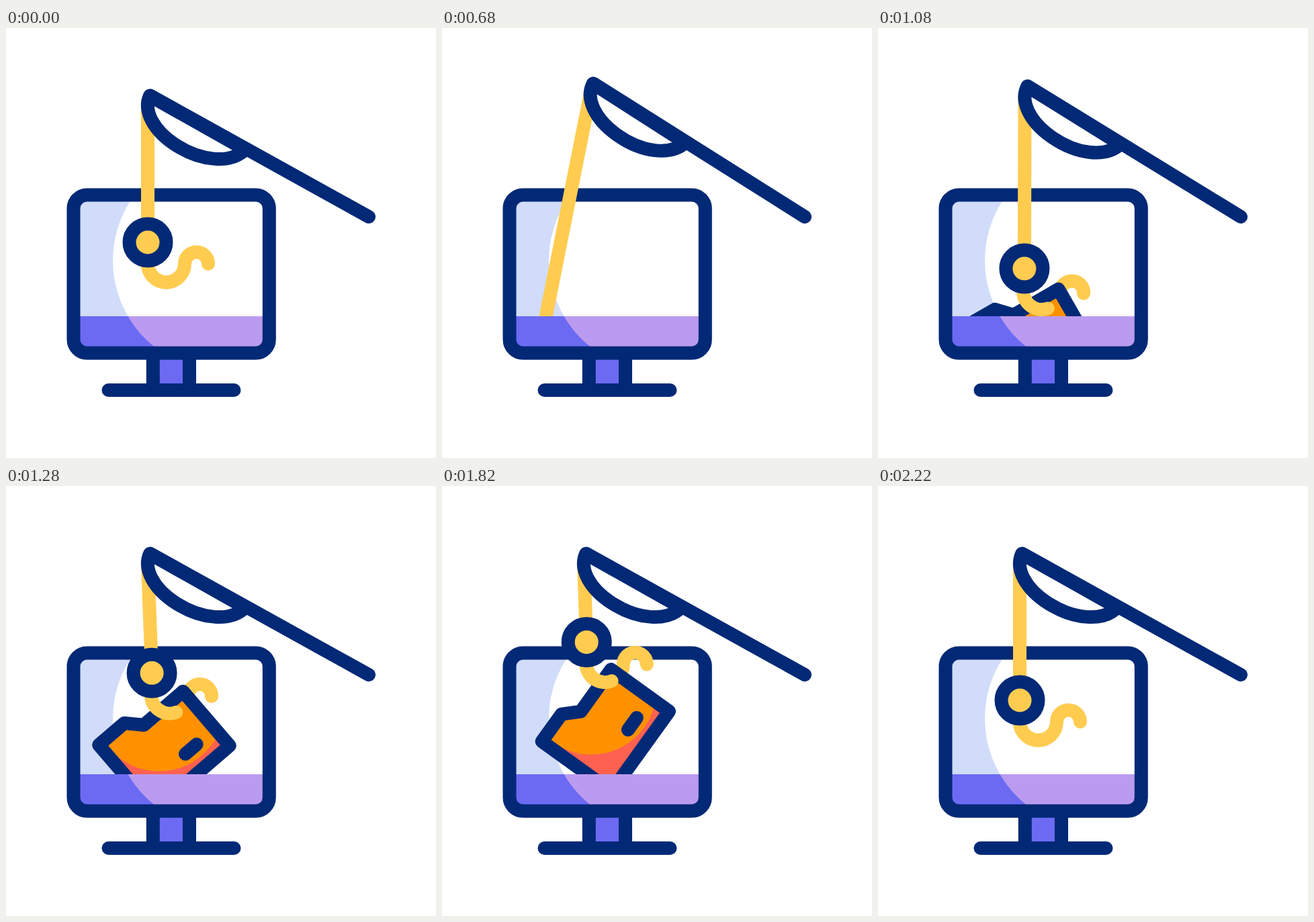
Recreate the animation shown at these times as an HTML page. Size 640 by 640 pixels, loop 2400 ms.

```html
<!DOCTYPE html>
<html lang="en">
<head>
<meta charset="utf-8">
<title>Phishing</title>
<style>
  html, body { margin: 0; width: 100%; height: 100%; overflow: hidden; background: #fff; }
  svg { display: block; width: 100vw; height: 100vh; }
  .ink { stroke: #022976; stroke-width: 20; stroke-linecap: round; stroke-linejoin: round; fill: none; }
  .gold { stroke: #ffcc50; stroke-width: 20; stroke-linecap: round; fill: none; }
</style>
</head>
<body>
<svg viewBox="0 0 640 640">
  <defs>
    <clipPath id="screen"><rect x="100.5" y="248.5" width="291" height="235.5" rx="20"/></clipPath>
    <clipPath id="air"><rect width="640" height="429"/></clipPath>
    <path id="body" d="M0 0H106.5V147H-21V97L0 77Z"/>
    <clipPath id="inside"><use href="#body"/></clipPath>
  </defs>

  <g id="monitor">
    <g clip-path="url(#screen)">
      <rect x="100" y="248" width="292" height="181" fill="#d1dcfa"/>
      <rect x="100" y="429" width="292" height="56" fill="#6c6af2"/>
      <g clip-path="url(#air)"><circle cx="323" cy="346" r="164" fill="#fff"/></g>
      <path d="M181.5 429A164 164 0 0 0 231 482V490H400V429Z" fill="#bb9bef"/>
    </g>
    <rect x="219" y="490" width="54" height="46" fill="#6c6af2"/>
    <path class="ink" d="M218.8 490V539M273 490V539M152.5 539H339.5"/>
    <rect class="ink" x="100.5" y="248.5" width="291.3" height="235.2" rx="20"/>
  </g>

  <g clip-path="url(#air)">
    <line id="line" class="gold" style="stroke-linecap:butt"/>
    <path id="hook" class="gold" d="M0 32A27.5 27.5 0 0 0 55 32A17.5 17.5 0 0 1 90 32"/>
    <g id="wallet">
      <use href="#body" fill="#ff6150"/>
      <circle cx="-7" cy="41" r="97.5" fill="#ff9100" clip-path="url(#inside)"/>
      <use href="#body" class="ink"/>
      <path class="ink" d="M73 36V58"/>
    </g>
    <path id="barb" class="gold" d="M0 32A27.5 27.5 0 0 0 38 57.4"/>
    <circle id="ring" class="ink" r="27.5" style="fill:#ffcc50"/>
  </g>

  <g id="rod">
    <path class="ink" style="fill:#fff" d="M214 101C204 123 219 153 254 175C292 199 335 202 356 181Z"/>
    <path class="ink" d="M214.5 100.5L540 281"/>
  </g>
</svg>
<script>
  const LOOP = 2400, BITE = 620, DROP = 1680, REST = 2220;
  const PIVOT = [540, 281], ANCHOR = [211, 116];
  const BARB = [38, 57.4];                     // hook point that holds the wallet
  const HOLE = [17, 28], MID = [53, 73];       // points inside the wallet

  const tracks = {
    rod:   [[200, 0], [920, 4.3], [1280, 0]],
    x:     [[200, 211], [600, 141], [BITE, 141], [1000, 218], [1600, 216], [DROP, 216], [REST, 211]],
    y:     [[200, 319], [600, 476], [BITE, 476], [1600, 216], [DROP, 216], [REST, 319]],
    hook:  [[200, 0], [600, 5], [BITE, 5], [1600, 0.8], [DROP, 0.8], [REST, 0]],
    tilt:  [[BITE, 76], [1600, 41], [DROP, 41], [REST, 8]],
    fallX: [[DROP, 0], [REST, 7]],
    fallY: [[DROP, 0], [REST, 200]]
  };

  const $ = id => document.getElementById(id);
  const ease = p => (1 - Math.cos(Math.PI * p)) / 2;

  function at(name, t) {
    const keys = tracks[name];
    if (t <= keys[0][0]) return keys[0][1];
    for (let i = 1; i < keys.length; i++) {
      const [t0, a] = keys[i - 1], [t1, b] = keys[i];
      if (t < t1) return a + (b - a) * ease((t - t0) / (t1 - t0));
    }
    return keys[keys.length - 1][1];
  }

  function turn([x, y], deg) {
    const r = deg * Math.PI / 180, c = Math.cos(r), s = Math.sin(r);
    return [x * c - y * s, x * s + y * c];
  }
  const add = (a, b) => [a[0] + b[0], a[1] + b[1]];
  const sub = (a, b) => [a[0] - b[0], a[1] - b[1]];

  function place(id, [x, y], deg) {
    $(id).setAttribute('transform', `translate(${x} ${y}) rotate(${deg})`);
  }

  // Wallet centre while it hangs from the hook
  function hanging(t) {
    const held = add([at('x', t), at('y', t)], turn(BARB, at('hook', t)));
    return add(held, turn(sub(MID, HOLE), at('tilt', t)));
  }

  function draw(t) {
    const rod = at('rod', t), ring = [at('x', t), at('y', t)], hook = at('hook', t);
    $('rod').setAttribute('transform', `rotate(${rod} ${PIVOT})`);

    const top = add(PIVOT, turn(sub(ANCHOR, PIVOT), rod));
    const ends = { x1: top[0], y1: top[1], x2: ring[0], y2: ring[1] };
    for (const k in ends) $('line').setAttribute(k, ends[k]);

    place('hook', ring, hook);
    place('barb', ring, hook);
    place('ring', ring, 0);

    const tilt = at('tilt', t);
    const mid = add(hanging(Math.min(t, DROP)), [at('fallX', t), at('fallY', t)]);
    place('wallet', sub(mid, turn(MID, tilt)), tilt);
    $('wallet').style.display = t > BITE && t < REST ? '' : 'none';
  }

  const start = performance.now();
  function frame() {
    draw((performance.now() - start) % LOOP);
    requestAnimationFrame(frame);
  }
  frame();
</script>
</body>
</html>
```
